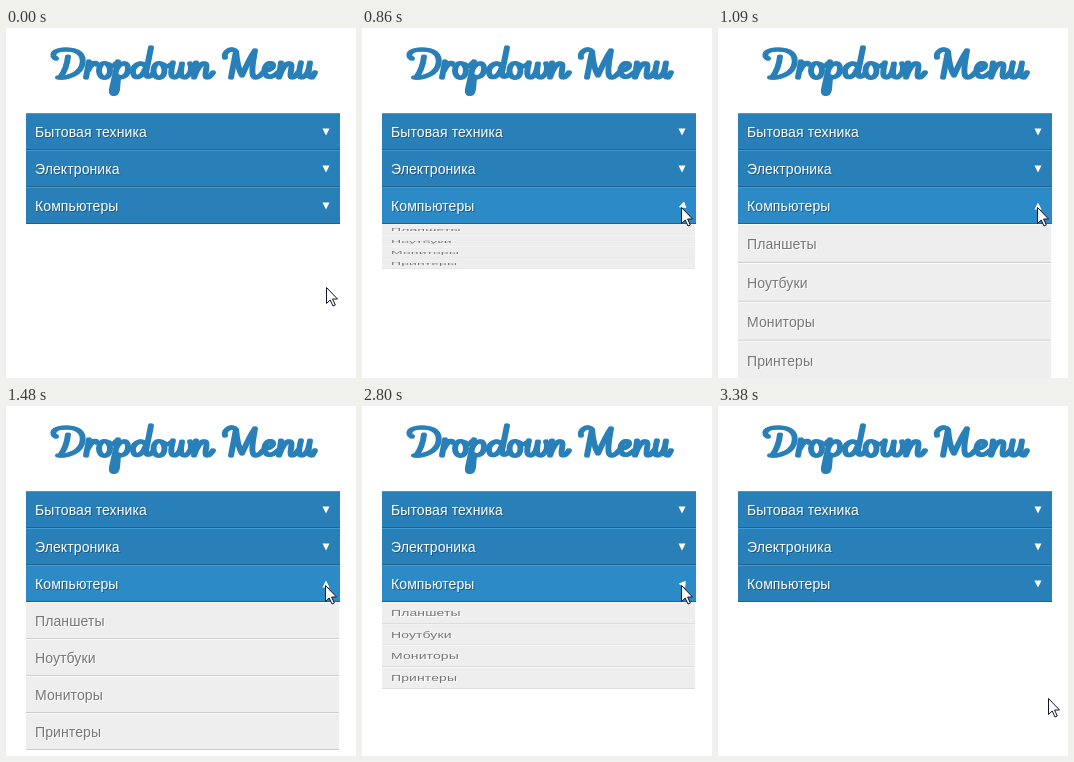
An HTML page for the animation above (3.42 s loop, 350x350 px).

```html
<!DOCTYPE html>
<html lang="ru">
<head>
<meta charset="utf-8">
<title>Dropdown Menu</title>
<style>
  html, body { margin: 0; width: 100%; height: 100%; overflow: hidden; background: #fff; }
  body { position: relative; font: 14px/38px "Liberation Sans", Arial, sans-serif; letter-spacing: .1px; }
  svg { position: absolute; left: 0; top: 0; }
  ul { position: absolute; left: 20px; margin: 0; padding: 0; list-style: none; }
  li { box-sizing: border-box; height: 37px; padding-left: 9px; position: relative; }
  #menu { top: 85px; width: 314px; }
  #menu li {
    background: #2980b9; color: #fefefe; text-shadow: 1px 1px 0 #1d5982;
    box-shadow: inset 0 1px 0 #409ad5, inset 0 -1px 0 #20638f;
  }
  #menu li.hover { background: #2c8ac7; }
  #menu i {
    position: absolute; left: 296px; top: 15px; width: 8px; height: 8px;
    background: #fff; clip-path: polygon(6% 6%, 94% 6%, 50% 94%);
  }
  #sub { top: 196px; width: 313px; transform-origin: 0 0; }
  #sub li {
    background: #eee; color: #777; text-shadow: 1px 1px 0 #fff;
    box-shadow: inset 0 1px 0 #fafafa, inset 0 -1px 0 #ccc;
  }
</style>
</head>
<body>
<svg width="350" height="80" role="img" aria-label="Dropdown Menu">
  <!-- Drawn twice, side by side, for thick stems and thin horizontals -->
  <g id="title" transform="translate(-.9 .5)" fill="none" stroke="#2980b9" stroke-width="4.2" stroke-linecap="round" stroke-linejoin="round">
    <path d="M50 30C45 28 46 21 60 21C72 21 78 26 76.5 35C75 44 64 50 52 49M62 28C61 37 59 43 54 49"/>
    <path d="M83 33L80 49M82 42C85 36 89 32 91 36"/>
    <ellipse cx="98.5" cy="42" rx="5.5" ry="7.5"/>
    <path d="M103 36C106 39 108 38 110 35"/>
    <path d="M112 33L106 61C105 67 110 67 111 61L112 49M110 42C113 34 122 32 122 40C122 48 115 51 110 47"/>
    <path d="M139 37C134 32 126 38 127 44C128 52 136 49 139 41M145 19L140 44C140 50 144 49 147 45"/>
    <ellipse cx="153" cy="42" rx="5.5" ry="7.5"/>
    <path d="M157 36C161 39 163 38 165 36"/>
    <path d="M167 34C164 46 165 49 169 49C173 48 175 42 176 35C174 46 175 49 179 49C184 47 187 40 184 35"/>
    <path id="n" d="M190 34L188 49C191 40 195 34 199 35C203 36 197 48 201 49C203 49 205 47 207 44"/>
    <path d="M219 29C217 23 227 18 230 23L225 49M230 23C231 34 233 42 236 47C240 38 244 29 249 22C247 33 245 42 247 47C249 51 254 48 257 44"/>
    <path d="M260 42C266 41 269 37 266 35C261 33 257 40 259 45C262 51 268 48 272 44"/>
    <use href="#n" x="85"/>
    <path d="M295 34C292 46 293 49 296 49C300 48 303 42 304 34C302 44 302 49 306 49C307 48 308 46 309 44"/>
  </g>
  <use href="#title" x="1.8"/>
</svg>
<ul id="menu">
  <li>Бытовая техника<i></i></li>
  <li>Электроника<i></i></li>
  <li id="last">Компьютеры<i id="arrow"></i></li>
</ul>
<ul id="sub">
  <li>Планшеты</li>
  <li>Ноутбуки</li>
  <li>Мониторы</li>
  <li>Принтеры</li>
</ul>
<svg id="cursor" width="14" height="21">
  <path d="M.5 .5V16.5L4.2 13L7 19L9.3 18L6.6 12H11.5Z" fill="#fff" stroke="#0c1630"/>
</svg>
<script>
  const LOOP = 3420;
  const $ = id => document.getElementById(id);
  const [last, arrow, sub, cursor] = ["last", "arrow", "sub", "cursor"].map($);
  const clamp = x => Math.min(1, Math.max(0, x));
  const smooth = x => x * x * (3 - 2 * x);

  // Bursts of movement: start, end, number of redraws
  const bursts = [[80, 550, 7], [860, 1330, 7], [1420, 1480, 2], [2490, 2950, 7], [3040, 3380, 5]];
  const ticks = [0];
  for (const [a, b, n] of bursts)
    for (let i = 0; i < n; i++)
      ticks.push(Math.floor((a + (b - a) * i / (n - 1)) / 10) * 10);

  // Height of the submenu: springs open, accelerates shut
  function openness(t) {
    if (t < 828 || t >= 2950) return 0;
    if (t >= 2430) return 1 - ((t - 2430) / 520) ** 2.4;
    if (t >= 1330) return 1;
    const u = t - 828;
    return 1 - Math.exp(-0.01 * u) * Math.cos(0.009 * u);
  }

  function draw(t) {
    const open = openness(t);
    sub.style.visibility = open ? "visible" : "hidden";
    sub.style.transform = `scaleY(${open})`;

    const turn = t < 2430 ? clamp(open / 0.78) : clamp(1 - (t - 2430) / 740);
    arrow.style.transform = `rotate(${180 * turn}deg)`;

    const come = smooth(clamp(t / 550)), leave = smooth(clamp((t - 2950) / 430));
    const x = 320 - come + 11 * leave;
    const y = 259 - 80 * come + 113 * leave;
    cursor.style.transform = `translate(${Math.round(x)}px, ${Math.round(y)}px)`;
    last.className = y < 196 ? "hover" : "";
  }

  const start = performance.now();
  function frame() {
    const t = (performance.now() - start) % LOOP;
    draw(ticks.findLast(k => k <= t));
    requestAnimationFrame(frame);
  }
  frame();
</script>
</body>
</html>
```
